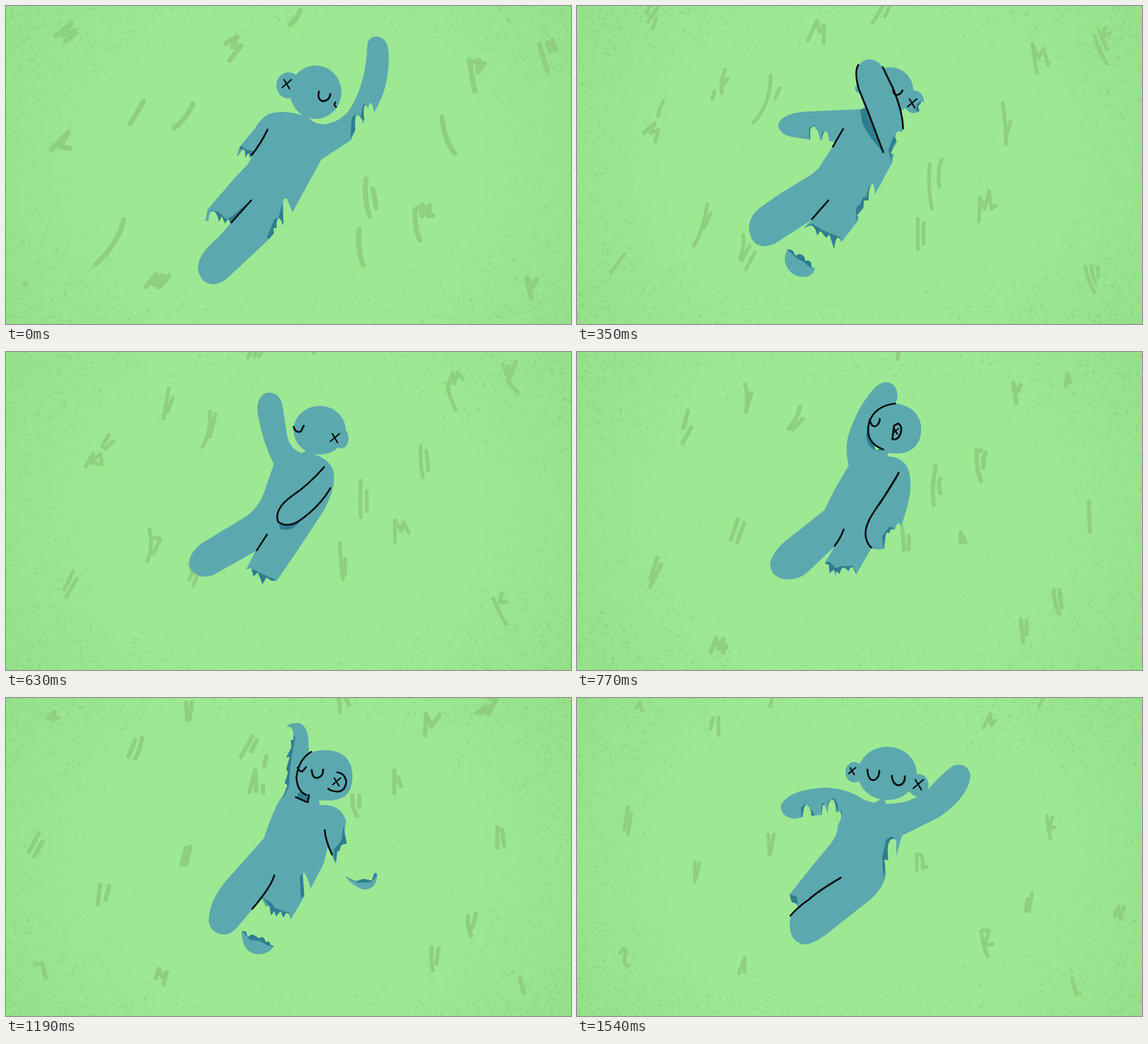
These frames come from a looping animation (998x561 px, 1.68 s). An HTML page with a canvas:

```html
<!DOCTYPE html>
<html lang="en">
<head>
<meta charset="utf-8">
<title>Falling figure</title>
<style>
html, body { margin: 0; width: 100%; height: 100%; overflow: hidden; background: #9de893; }
canvas { display: block; width: 100vw; height: 100vh; }
</style>
</head>
<body>
<canvas id="stage" width="998" height="561"></canvas>
<script>
const W = 998, H = 561, LOOP = 1680;
const COLOR = { ground: '#9de893', grass: '#8ecf80', skin: '#5ba9af', shade: '#2f7e8f', ink: '#080d10' };

// start: ms; ovals: cx, cy, rx, ry; crosses: x, y, half size; drift: reuse the previous grass, one step farther away
const poses = [
  {
    start: 0, blade: 9,
    ovals: [[547, 152, 45.5, 47], [499, 140, 21.5, 23]],
    body: `M521 192Q490 183 465 190Q450 198 441 214L413 248L407 265L412 262L416 256Q420 250 422 256L423 269L428 259L431 269L437 261
      L428 278L400 308L356 359L352 380L358 378Q358 362 366 362Q373 364 376 381L381 371L387 384L392 376L397 383L375 408
      Q337 440 339 464Q344 491 367 491Q378 490 389 482L465 411L474 400L472 392L478 392Q477 377 482 374Q487 377 488 386L490 386
      L489 345Q492 336 497 341Q501 353 506 364L530 320L557 271L610 236L617 218Q615 193 621 193Q627 194 631 208L633 201Q630 177 635 174
      Q637 176 640 182Q641 170 645 171Q648 175 650 188Q664 165 670 142Q677 112 676 85Q675 54 653 54Q638 55 638 73
      Q636 130 612 174Q596 205 560 209Q543 207 537 199L533 193Z`,
    shade: `M608 234L611 197L616 190L620 215ZM626 196L631 174L636 172L634 205ZM460 410L474 376L483 373L478 392L472 400L474 407Z
      M480 378L490 342L494 375L487 388ZM362 360L376 364L389 376L398 372L433 342L397 383L391 377L387 384L381 372L376 381Q373 364 362 362Z
      M411 252L415 247L426 254L437 256L433 268L428 259L423 267L421 255L416 253Z`,
    lines: 'M462 218Q450 243 434 263M433 343L398 382M553 151Q549 164 559 168Q572 167 573 155M582 170Q578 175 583 178',
    crosses: [[496, 138, 8]],
    grass: `M88 53l28-22M102 50l20-7M105 62l18-14M388 66l20-12-8 18 15-2-20 26M520 8Q512 25 502 33M243 168l-24 40M330 173Q318 200 297 215
      M80 253l30-30-14 25 17 3M208 377Q198 420 158 456M248 495l18-22-5 18 16-16-8 18M270 496l18-20M34 490h1M818 95l10 55M822 100l14-4-3 20 12-15
      M942 67l14 48M956 65l6 15 3-20 6 18M770 196Q775 240 793 260M636 305Q632 340 642 370M648 323l6 33M722 360Q722 395 731 413
      M722 360l14-8-2 18 14-18-2 18h8M624 394Q620 430 631 457M920 480l8 36M922 482l8 12 8-12`
  },
  {
    start: 140, blade: 6,
    ovals: [[560, 146, 42, 47], [506, 131, 21, 21]],
    body: `M524 192Q500 181 482 186Q465 190 448 200L395 222Q356 239 352 262L357 281Q364 288 377 288L405 284L409 258Q414 257 415 278L419 274
      Q421 248 427 247Q431 249 432 270Q434 249 440 260L437 270L410 306L380 340L356 362L367 359L376 380L381 370Q387 371 390 387L392 376L399 390
      L362 432Q355 446 361 461Q370 479 388 479Q407 478 413 460L418 460L417 434Q423 429 425 443L431 430Q436 428 438 438L471 403
      Q472 388 477 387L480 395Q483 368 490 370L493 384Q498 342 510 329Q516 331 515 350L531 323Q526 292 538 293Q544 293 545 298L560 265L585 251
      Q608 238 615 220L612 195Q617 190 622 194Q620 177 625 177Q629 180 628 192L634 140Q640 118 640 102Q636 84 617 84Q602 86 596 102
      Q592 140 574 188L560 206L549 203V186L527 176Z
      M309 411L314 413L320 416L325 418L333 432L338 428L341 435L347 433L349 439L359 442Q354 448 344 448Q312 441 309 411Z`,
    shade: `M592 111L584 157L571 195L553 195Q564 178 574 165L580 145ZM406 282L405 264L411 256L415 278ZM415 278Q412 260 422 246L427 247L420 274Z
      M357 360L364 356L379 366L399 374L435 347L399 390L392 380L390 386L382 372L376 379L367 362Z
      M309 410L324 414L333 426L350 434L358 442L347 443L336 436L328 429L319 420ZM611 224L609 210L612 193L619 191L616 212Z
      M527 330L524 300L534 291L531 306L532 321ZM495 354Q495 335 509 327L500 350ZM479 395L481 376L489 368L488 384ZM415 462L413 438L420 431Z
      M514 160L522 164L521 180L516 176Z`,
    lines: 'M466 215Q450 247 433 270M435 347Q410 379 396 390Q364 429 358 449M596 101Q591 128 583 158Q575 195 555 208M526 137Q528 150 537 151Q548 149 549 141M573 149Q574 161 583 160',
    crosses: [[500, 129, 8]],
    gap: 'M550 196H565L558 206L549 201ZM500 152L509 150L512 157L519 155Q520 172 526 183L516 186Z',
    grass: `M104 46l22-20M107 56q12-20 27-24M393 57l14-14 4 10 10-14 8 2-6 16 14-4-10 20M538 0q-4 12-15 24M262 141l-16 22M240 173l-8 10
      M340 151q-10 28-32 52M104 226l14-10-8 18 12-6-14 32M219 357q0 40-34 89M281 441l-22 30M295 443l-26 36M302 463l-18 20M60 467l-10 18
      M807 92q2 32 14 44M816 118q12-20 17-14M830 120l-6 14M930 76l10 30 6-18 10-4M940 105l12 6M755 215q10 40 24 52l7 2
      M635 293q-12 35 0 66M648 315q-8 10-2 36M713 394l4-40 14 22 8-16 12 26M615 398q0 30 4 52M926 442l2 24M917 478l18-2-12 12 14 2-18 10`
  },
  {
    start: 350, blade: 6.5,
    ovals: [[553, 149, 41, 41], [595, 169, 18, 20], [500, 145, 9, 9]],
    body: `M503 182L410 186Q361 188 355 210Q358 227 380 231L412 236L412 218Q416 208 422 216Q427 221 429 236L433 237Q434 220 440 221Q444 224 445 238L457 240
      L426 287L413 298L357 332L330 351Q301 370 304 396Q309 424 332 424Q344 423 356 415L415 377L400 392L414 387Q422 390 424 405L430 397L440 409L446 403
      L454 430Q457 405 463 409L467 417L496 379L498 372L494 370L506 356L507 343L515 343Q515 315 523 313Q526 320 526 333L557 276L560 261L554 260
      L565 240Q559 224 568 221L575 222L577 214Q574 180 560 149L540 108Q530 94 515 94Q494 98 493 120Q495 148 508 178Z
      M372 429Q378 428 383 434Q384 440 388 440Q391 436 398 439Q404 444 403 450Q410 446 414 454L414 460L421 463Q415 478 402 478Q379 478 370 459Q363 444 372 429Z`,
    shade: `M500 183L511 179L540 257Q515 231 504 207ZM410 237L410 215L420 209L416 225L418 238ZM433 238L432 224L440 220L437 238Z
      M555 274L550 254L559 230L566 236L557 250ZM492 380L493 356L501 348L505 338L511 336L515 320L523 311L519 340L509 347L508 358L498 366Z
      M404 388L416 384L431 394L452 403L466 408L455 431L446 404L440 411L430 398L424 406L414 387Z
      M371 429L383 431L403 440L421 462L411 461L401 452L388 445L380 438ZM599 186L600 173L608 167L606 186Z`,
    lines: 'M497 104Q489 116 498 147L512 181L541 258M540 108L558 145Q575 185 576 216M558 143Q558 157 565 157Q572 156 575 149M470 217L452 248M444 343L415 376',
    crosses: [[592, 172, 8]],
    gap: 'M615 171Q607 166 607 173Q600 176 605 184L602 190L618 190Z',
    grass: `M128 0l-6 12M142 3l-16 24M140 22l-6 18M408 60l16-34 4 20 8-12v32M540 0l-18 30M552 0l-8 18M262 112q-10 20-6 42M243 150l-4 14M266 128l-10 14
      M342 123q0 50-30 82M358 145l-8 18M153 168q-8 12-10 26M118 224l20-18-8 18 14-5-6 20M230 350q-8 50-24 73M236 366l-12 26M294 404q2 20-6 42
      M305 423l-14 26M314 435l-16 30M84 438l-24 32M804 67l8 50M804 67l12 24 8-16 8 28M914 52q6 24 22 50M922 44l14 32M934 38l-6 18 14-8
      M752 172q4 20 6 72M766 204l-6 20M623 279q-4 40 4 78M644 271q-8 20-4 48M710 380l2-42 8 20 8-32 4 32 8-6M602 375v54M612 383v36
      M898 460q4 25 16 45M908 459q2 15 8 30M920 462v16`
  },
  {
    start: 490, blade: 7,
    ovals: [[546, 140, 45.5, 42], [593, 161, 17, 20]],
    body: `M520 176L490 170Q469 163 456 147L432 117Q421 102 405 106Q387 116 392 140Q405 172 442 192Q434 205 441 223L461 236L455 253Q446 272 421 289
      Q395 307 350 322Q311 334 310 359Q315 386 335 388Q351 390 370 382L372 362Q380 349 387 363Q392 358 396 367L433 353L410 391L417 388L421 403
      Q426 392 430 404L433 401Q436 393 439 397L447 425Q451 411 456 412L466 423L508 362L509 342Q514 338 515 351L522 345L519 319L525 318L527 318
      Q529 299 533 298Q537 300 540 318L566 272Q580 244 578 222Q577 195 558 187L538 181V170Z`,
    shade: `M461 237L455 252Q483 248 510 254L535 250Q500 247 461 237ZM367 383L367 364L379 353L375 377ZM506 363L505 343L514 334L519 314L532 298L526 318L523 345L515 351L511 341Z
      M412 390L425 389L432 395L443 391L451 407L465 420L456 413L447 427L440 399L431 404L421 403Z`,
    lines: 'M442 192Q456 183 489 193Q520 207 555 206M461 236L513 247Q540 252 568 242M502 136Q506 142 513 130M535 137Q534 152 545 153Q554 152 557 140M452 328L431 358',
    crosses: [[593, 164, 8]],
    grass: `M158 0l-10 18M168 0l-6 10M420 30l16-30M432 26l10-18M440 28l10-14M546 0l-4 22M274 85l-10 52M281 102l-10 24M350 125q2 40-14 62M360 130l-10 40
      M163 166l-12 20M120 222l14-22M172 177l-16 14M130 214l18-14 2 18-14-2zM238 333q8 30-4 56M246 348q20-2 8 8l-8 20M312 393l6 18M324 395l-12 26
      M335 394l-16 38M97 407l-16 32M104 420l-20 32M790 75q0 20 14 46M792 78l6-20 4 18 6-20 10 12M892 42l14 36 14 14M902 45l4 18 10-26
      M740 186q-2 30 4 55M750 194l4 34M629 247q-2 40 0 64M640 266v34M692 355v-38l12 18 4-14 10 18M590 357q2 40 6 64M600 385v28
      M874 454q12 30 24 46M890 445l-4 16h12`
  },
  {
    start: 630, blade: 7, drift: true,
    ovals: [[554, 138, 46, 43], [592, 152, 13, 18]],
    body: `M522 178Q503 172 497 150L488 92Q481 69 460 72Q440 80 445 112Q454 160 473 198L455 250Q446 274 424 290L345 338Q319 358 325 380Q336 402 365 394
      L440 352L424 384L433 381L437 396L445 389L453 410L460 398L470 404L478 404L515 350L560 282Q588 232 576 204Q566 187 545 181L538 172Z`,
    shade: `M426 382L438 384L456 393L477 402L468 404L460 398L453 410L445 390L437 396L433 383ZM482 300Q500 314 521 296Q505 320 484 312Z`,
    lines: 'M562 203Q534 235 505 254Q472 278 481 300Q500 312 522 295Q556 270 573 240M508 132Q512 144 521 140L526 130M461 322L443 350',
    crosses: [[581, 152, 8]]
  },
  {
    start: 770, blade: 7.5,
    ovals: [],
    body: `M480 200Q470 162 486 129Q500 91 527 62Q545 46 560 59Q571 74 562 91L550 178L548 184Q574 185 584 204Q596 235 580 284L573 307Q568 298 564 306L561 314
      Q553 309 552 320Q545 315 545 327L543 347Q528 350 520 346L493 393L488 381Q483 376 480 388L474 382Q468 376 464 392L459 387L457 395L453 384L446 391
      L445 376L437 373L455 343L409 387Q391 403 367 401Q342 397 341 373Q346 351 370 332L437 279L455 243Z
      M514 137C514 108 535 91 563 91C592 94 608 113 608 136C608 162 592 180 563 179C532 178 514 162 514 137Z`,
    shade: `M514 133Q512 156 540 173L528 175Q510 165 511 145ZM541 348L539 325L552 308L560 310L552 320L545 325ZM439 371L446 370L457 381L466 378L487 377L493 388L480 385L474 381L464 393L453 385L446 390Z`,
    lines: 'M562 91Q526 95 516 124Q507 159 541 172M517 119Q520 133 527 131Q534 128 535 118M568 213C545 261 505 294 510 326Q513 340 520 345M568 214L534 269M471 313Q466 328 455 342M567 126Q575 130 572 142Q568 156 557 154L560 130Z',
    crosses: [[563, 140, 5]],
    gap: 'M525 166L535 171L528 174Z',
    grass: `M568 0l-2 12M297 57q6 20 2 48M308 73l-8 24M196 104l-8 30M202 133l-16 28M394 97q-4 20-20 38M399 118l-18 18M284 295l-12 36M295 302l-12 34
      M142 363l-12 36M149 375l-20 40M236 530l10-26 4 20 8-18v24l6-12M770 54l6 36M770 54l8 16 6-12M864 60l2-22 6 16M706 174q-2 30 8 54M706 174h8
      M722 178q-6 14-4 26M634 200q-8 35-4 70M642 223q-6 10 0 26M574 308l4 42M586 324v24M678 336v-18l8 18M904 264l2 54M842 420q0 20 10 42
      M852 420l4 30M784 472l4 40M794 474v24`
  },
  {
    start: 980, blade: 7, drift: true,
    ovals: [[562, 137, 47, 44]],
    body: `M480 192Q480 150 489 115Q497 74 510 56Q528 42 543 57Q551 72 545 100L548 182Q582 185 592 212L605 252Q613 290 603 302Q590 310 582 297L572 268
      L552 312L526 348L502 392L494 380L486 388L478 379L468 390L461 374L450 379L448 363L440 366L408 396Q390 412 370 408Q347 401 350 378Q356 356 382 328L447 265Z`,
    shade: 'M514 140Q514 160 538 173L526 178Q511 168 512 150ZM442 364L461 371L486 378L500 387L486 386L478 380L468 388L461 376L450 379Z',
    lines: 'M550 93Q519 101 514 132Q511 161 539 173M516 121Q520 133 526 131L532 121M548 127Q552 136 559 127M472 313L444 358M566 222Q566 250 574 272M572 130Q584 128 587 142Q584 159 571 160',
    crosses: [[575, 145, 6]]
  },
  {
    start: 1190, blade: 7.5,
    ovals: [],
    body: `M479 187L490 172L497 154L492 150L498 132L495 125L501 104L495 105L504 87L503 74L508 74L507 58Q503 49 495 50Q502 43 517 44Q531 47 534 72
      L535 96L538 175L553 180L554 189Q592 186 601 218L598 236L602 257L596 258Q591 258 590 268L585 272L583 293L568 264L561 293L538 336
      Q530 306 524 308L527 350L503 391Q500 376 494 380L490 388L485 376L477 386L474 376L468 384L465 366L459 369L452 354L435 373L413 399
      Q400 417 385 417Q361 416 358 393Q359 357 389 322L455 248L467 215Z
      M511 139C511 108 532 92 563 92C596 92 612 110 612 137C612 168 598 181 568 181C530 181 511 168 511 139Z
      M598 314L618 323L632 319L646 322L651 308L656 310Q655 338 633 338Q616 335 598 314Z
      M416 411L424 412L427 422Q434 414 441 420L447 424Q455 417 459 431Q465 426 467 435L473 438Q463 453 443 452Q417 449 416 411Z`,
    shade: `M477 188L490 160L490 135L495 92L505 62L511 70L507 90L504 108L501 134L500 156L491 174Z M516 166L538 173L534 184L514 178Z
      M580 292L579 268L593 250L596 226L603 257L591 262L590 269ZM521 353L519 316L525 306L529 347Z
      M453 352L467 360L476 371L503 380L490 387L484 377L477 385L468 382L465 368Z
      M602 316L630 318L648 316L651 308L655 313L645 325L622 326ZM416 410L440 414L473 433L472 439L461 436L449 429L431 427Z`,
    lines: 'M539 95Q516 109 513 141Q515 166 531 171M512 175L530 183M535 171L533 184M515 123Q520 132 524 129L530 122M540 127Q541 142 550 141Q561 138 560 126M585 131Q599 133 601 148Q599 166 583 165Q574 164 569 160M563 233Q564 251 576 276M474 313Q467 335 435 372',
    crosses: [[584, 148, 7]],
    grass: `M74 36l12-12-4 14 10-4M318 8l2 30M328 8l-4 30M588 0l2 24M600 0l6 12M740 66l2-38 10 22 14-20M832 26l16-12-8 14 18-16-6 16 14-24-16-6
      M228 74l-12 30M240 70q-2 20-12 37M435 68l-20 36M443 74l-10 20M460 102l-4 18M430 166l10-38 2 36M454 155v12M686 128v40M692 140l6 16
      M612 172q-2 20 8 36M624 172v20M58 238l-18 34M64 254l-14 26M310 294l8-30M326 262l-8 32M166 330l-4 34M182 332l-6 24M52 470l12-2 6 26
      M264 494l6-16 6 14 8-8-6 22M752 440q-2 25 2 40M764 442l-4 26M816 384q-2 20 6 36M830 380q-2 16-8 26M868 228v36M876 232l4 28M908 494l6 26`
  },
  {
    start: 1400, blade: 7, drift: true,
    ovals: [[555, 135, 49, 46], [601, 150, 14, 19]],
    body: `M524 184Q490 172 470 145L442 105Q424 87 407 101Q393 118 409 143Q434 183 473 207L457 250L402 314Q366 358 367 395Q372 426 395 425
      Q411 422 427 403L450 379L461 384L466 372L474 384L484 374L493 384L515 365L545 320L560 260L575 244L630 254Q668 258 678 236Q680 211 648 203
      Q590 184 545 183L541 174Z`,
    shade: 'M450 380L466 370L493 380L484 376L474 385L466 374L461 385ZM545 318L543 284L560 258L550 286Z',
    lines: 'M507 128Q510 142 518 139L525 128M547 132Q549 147 558 147Q568 145 568 132M471 315Q455 343 428 378',
    crosses: [[597, 151, 7]]
  },
  {
    start: 1540, blade: 6.5,
    ovals: [[548, 133, 52, 47], [490, 131, 16, 18], [603, 154, 18, 20]],
    body: `M525 185L508 180Q475 158 435 158Q371 163 360 190Q360 211 385 213L399 210Q400 188 406 189Q413 191 414 208L432 206L434 190Q437 184 440 195L443 203
      Q443 180 451 179Q457 181 457 203Q464 197 466 203L467 211L461 224Q461 241 448 257L415 297L375 347L379 360L388 363L390 372L377 384Q370 430 402 435
      Q420 433 443 415L520 354Q541 335 546 311L543 285L550 286Q546 254 556 249Q564 247 564 254L564 278L574 243L640 210Q693 173 695 137Q691 113 666 119
      Q653 125 621 160L598 176Q576 187 546 187L542 176Z`,
    shade: `M396 212L396 193L404 186L401 200ZM408 188L420 207L414 210ZM431 207L432 188L437 184L435 205ZM442 201L444 182L454 176L461 188L461 204L455 184L450 181ZM460 223L460 207L468 197L467 212Z
      M376 347L388 350L391 365L379 360ZM541 320L539 280L546 250L555 244L564 249L553 254L550 287L546 290Z`,
    lines: 'M466 317Q425 341 409 356Q390 369 377 384M513 126Q514 145 524 145Q534 142 534 128M556 137Q558 154 569 154Q580 151 579 138',
    crosses: [[486, 129, 6], [603, 153, 9]],
    grass: `M105 18l6-10 4 14M240 36l-4 18M250 35v30M345 0l-4 14M824 0l-8 14M718 52l12-24 2 20 6-8M90 192l-6 40M96 204l-6 36M208 290v34M216 292l-6 26
      M338 242l2 34M348 240l-6 34M76 450q8-16 10 0-6 24 6 22M286 486l10-28v26M830 208l6 40M840 210l-6 20 10-2M600 304v-28q14-2 10 24l8-2
      M792 376l4-22M804 344l-6 32M714 412q4 30 12 44M716 410h12l-8 26 14-2M950 386l6-18 4 20 6-20M874 494l8 28 6-2`
  }
];

function seeded(seed) {
  return () => {
    seed = (seed * 1664525 + 1013904223) >>> 0;
    return seed / 4294967296;
  };
}

function newLayer() {
  const c = Object.assign(document.createElement('canvas'), { width: W, height: H }).getContext('2d');
  c.lineCap = c.lineJoin = 'round';
  return c;
}

// Soft tint and grain that thicken toward the edges
function paintGround(c, seed) {
  const rnd = seeded(seed * 7919 + 17);
  c.fillStyle = COLOR.ground;
  c.fillRect(0, 0, W, H);
  const tint = c.createRadialGradient(W / 2, H / 2, 330, W / 2, H / 2, 600);
  tint.addColorStop(0, 'rgba(128,200,114,0)');
  tint.addColorStop(1, 'rgba(128,200,114,.25)');
  c.fillStyle = tint;
  c.fillRect(0, 0, W, H);
  c.fillStyle = 'rgba(112,184,98,.14)';
  for (let i = 0; i < 15000; i++) {
    const x = rnd() * W, y = rnd() * H, r = 0.8 + rnd() * 1.5;
    const far = Math.hypot((x - W / 2) / (W / 2), (y - H / 2) / (H / 2));
    if (rnd() > Math.max(0.01, (far - 0.7) * 1.2)) continue;
    c.beginPath();
    c.ellipse(x, y, r * 1.4, r, rnd() * 3, 0, 7);
    c.fill();
  }
}

function paintGrass(c, pose, path) {
  c.save();
  if (pose.drift) c.transform(0.955, 0, 0, 1, 26, -20);
  c.strokeStyle = COLOR.grass;
  c.lineWidth = pose.blade;
  c.stroke(new Path2D(path));
  c.restore();
}

function paintFigure(c, pose) {
  const fill = (color, path, mode) => {
    c.globalCompositeOperation = mode;
    c.fillStyle = color;
    c.fill(new Path2D(path));
  };
  fill(COLOR.skin, pose.body, 'source-over');
  for (const [x, y, rx, ry] of pose.ovals) {
    c.beginPath();
    c.ellipse(x, y, rx, ry, 0, 0, 7);
    c.fill();
  }
  // Shade stays on the skin, so the bites remain open
  fill(COLOR.shade, pose.shade, 'source-atop');
  if (pose.gap) fill(COLOR.ink, pose.gap, 'destination-out');
  c.globalCompositeOperation = 'source-over';
  c.strokeStyle = COLOR.ink;
  c.lineWidth = 3.2;
  c.stroke(new Path2D(pose.lines));
  c.lineWidth = 2.5;
  for (const [x, y, s] of pose.crosses) {
    c.beginPath();
    c.moveTo(x - s * 0.6, y - s);
    c.lineTo(x + s * 0.6, y + s);
    c.moveTo(x + s, y - s);
    c.lineTo(x - s, y + s * 0.7);
    c.stroke();
  }
}

let grass = '';
const cels = poses.map((pose, i) => {
  const cel = newLayer(), figure = newLayer();
  grass = pose.grass || grass;
  paintGround(cel, i + 1);
  paintGrass(cel, pose, grass);
  paintFigure(figure, pose);
  cel.drawImage(figure.canvas, 0, 0);
  return cel.canvas;
});

const stage = document.getElementById('stage').getContext('2d');
const begin = performance.now();
let shown = -1;

function tick() {
  const t = (performance.now() - begin) % LOOP;
  const now = poses.filter(p => p.start <= t).length - 1;
  if (now !== shown) stage.drawImage(cels[shown = now], 0, 0);
  requestAnimationFrame(tick);
}
tick();
</script>
</body>
</html>
```
